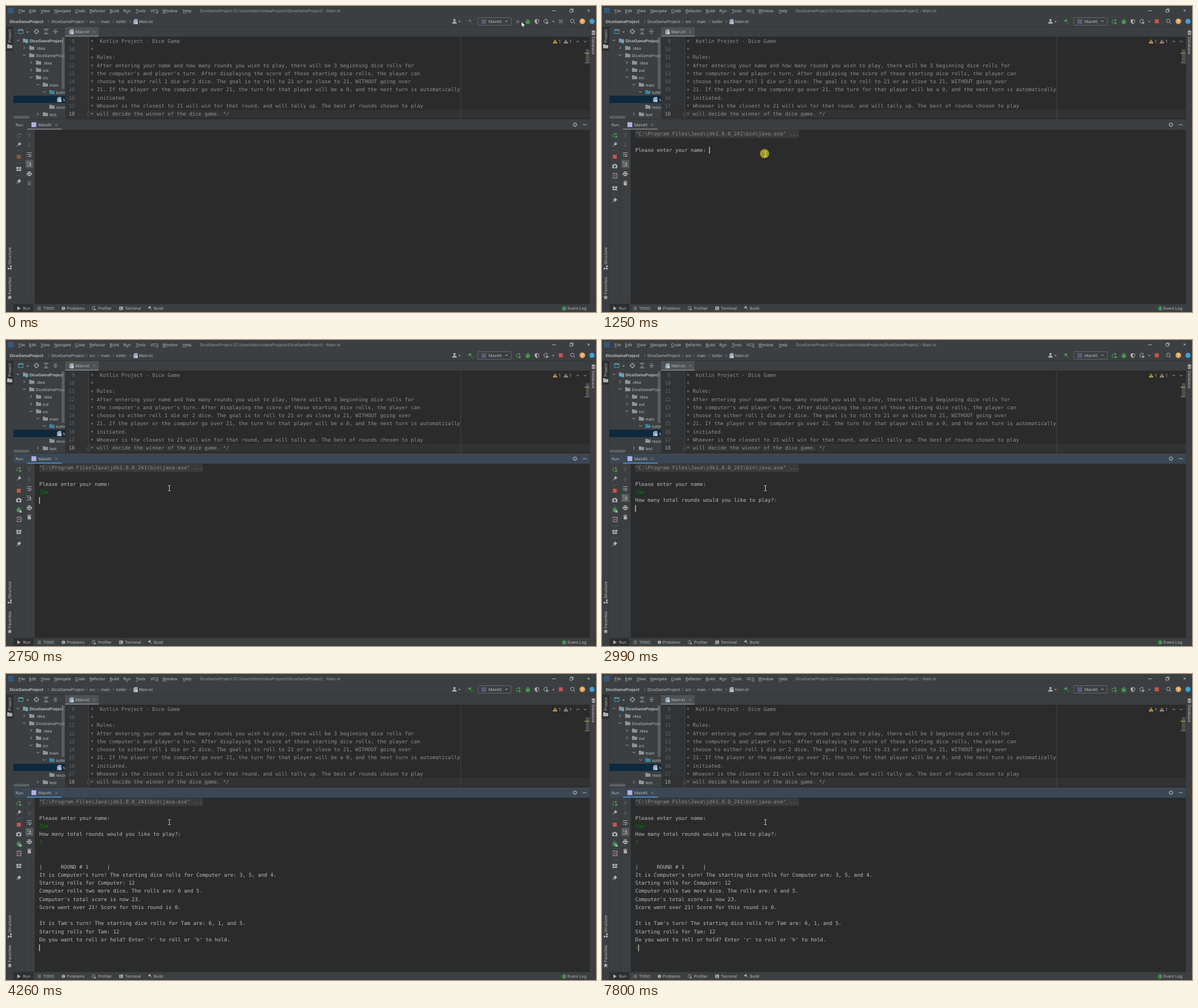
These frames come from a looping animation (1038x539 px, 8 s). An HTML page:

```html
<!DOCTYPE html>
<html lang="en">
<head>
<meta charset="utf-8">
<title>Dice game run</title>
<style>
  html, body { margin: 0; width: 100%; height: 100%; overflow: hidden; background: #3c3f41; }
  svg { display: block; width: 100%; height: 100%; }
  text { font: 7px Inter, sans-serif; fill: #bbb; white-space: pre; text-rendering: geometricPrecision; }
  .mono { font: 9px "DejaVu Sans Mono", monospace; }
  .bold { font-weight: 700; }
  .input { font-style: italic; fill: #007f00; }
  .u { text-decoration: underline; text-decoration-thickness: .5px; }
</style>
</head>
<body>
<svg id="stage" viewBox="0 0 1038 539" xmlns="http://www.w3.org/2000/svg"></svg>
<script>
const LOOP = 8000, COL = 5.42, ROW = 14.265;
const GREY = '#afb1b3', DIM = '#606365', GREEN = '#499c54', RED = '#c75450';

// Each icon is [stroked path, filled path], centred on 0,0.
const ICONS = {
  down: ['M-2.4 -1.2L0 1.2L2.4 -1.2', ''],
  up: ['M-2.4 1.2L0 -1.2L2.4 1.2', ''],
  right: ['M-1.2 -2.4L1.2 0L-1.2 2.4', ''],
  drop: ['', 'M-2 -1H2L0 1.3z'],
  close: ['M-2 -2L2 2M2 -2L-2 2', ''],
  folder: ['', 'M-4.5 -3.5H-1L0 -2.2H4.5V3.5H-4.5z'],
  doc: ['', 'M-1 -4.5H4V4.5H-3.5V-2z'],
  play: ['', 'M-3 -4L4 0L-3 4z'],
  reload: ['M2.6 -2.2A3.4 3.4 0 1 0 3.3 1', 'M4.3 -4.5V-.7H.5z'],
  rerun: ['M1.5 -2.6H-.6A3 3 0 0 0 -.8 3.4', 'M1 -4.8L4.4 -2.6L1 -.4zM.7 .8H4.2V4.3H.7z'],
  stop: ['', 'M-3.5 -3.5H3.5V3.5H-3.5z'],
  hammer: ['M-.5 -.8L3.7 3.6', 'M-4.4 -1.2L-1 -4.3L1.6 -3.6L.9 -2.5L1.6 -1L0 .7L-1.8 -.9L-3.2 .4z'],
  wrench: ['M-3.6 3.6L.8 -.8', 'M.2 1.2L-1 0L-.8 -2.6L1.5 -4.2L3 -3.9L1.4 -2.2L2.2 -1.4L4 -3L4.2 -1.2L2.6 1z'],
  bug: ['M-4 -2.2L-2 -1M4 -2.2L2 -1M-4.3 .6H4.3M-3.8 3.5L-2 2.3M3.8 3.5L2 2.3', 'M-2 -3A2 1.8 0 0 1 2 -3zM-2.7 -2H2.7V1.6A2.7 2.7 0 0 1 -2.7 1.6z'],
  shield: ['M0 -3.9L3.4 -2.8V0Q3 3 0 4Q-3 3 -3.4 0V-2.8z', 'M0 -4V4Q-3 3 -3.4 0V-2.8z'],
  clock: ['M2.8 -2.3A3.6 3.6 0 1 0 1 3.3M0 0L2.4 -1.8', 'M1 0L5 2.4L1 4.8z'],
  search: ['M1.8 1.8L4.2 4.2M2.4 -.7A3.1 3.1 0 1 1 -3.8 -.7A3.1 3.1 0 1 1 2.4 -.7', ''],
  person: ['', 'M-2 -2.3A2 2 0 0 1 2 -2.3Q2 0 0 0Q-2 0 -2 -2.3M-4 4Q-4 .6 0 .6Q4 .6 4 4z'],
  target: ['M3.5 0A3.5 3.5 0 1 1 -3.5 0A3.5 3.5 0 1 1 3.5 0M0 -4.7V-1.6M0 4.7V1.6M-4.7 0H-1.6M4.7 0H1.6', ''],
  expand: ['M-4 -4H4M-4 4H4M-2 -1L0 -2.7L2 -1M-2 1L0 2.7L2 1', ''],
  collapse: ['M-4 0H4M-2 -4L0 -2.2L2 -4M-2 4L0 2.2L2 4', ''],
  view: ['M-4 -3.5H4V3.5H-4z', 'M-4 -4H4V-1.7H-4z'],
  layout: ['', 'M-4.3 -3.5H-.5V0H-4.3zM.5 -3.5H4.3V0H.5zM-4.3 1H4.3V3.5H-4.3z'],
  pin: ['M-.8 .8L-4 4', 'M.5 -4.4L4.4 -.5L3.4 0L1.6 1.2L1.2 3.4L-3.4 -1.2L-1.2 -1.6L0 -3.4z'],
  camera: ['', 'M-4.5 -2.6H-2.2L-1.2 -4H1.2L2.2 -2.6H4.5V3.7H-4.5zM2 .5A2 2 0 1 0 -2 .5A2 2 0 1 0 2 .5z'],
  exit: ['M-3 -1.8V-4H4V4H-3V1.8', ''],
  enter: ['M-4.7 0H.5', 'M-.3 -2.4L2.4 0L-.3 2.4z'],
  arrowUp: ['M0 3.7V-3.3M-2.8 -.6L0 -3.4L2.8 -.6', ''],
  arrowDown: ['M0 -3.7V3.3M-2.8 .6L0 3.4L2.8 .6', ''],
  wrap: ['M-4.2 -3.2H4M-4.2 0H2.5A1.7 1.7 0 0 1 2.5 3.2H0M-4.2 3.2H-2.5', 'M1 1.2V5L-1.4 3.2z'],
  toEnd: ['M-4 3.6H4M-4 -3.5H-1.5M-4 -1H-1.5M1.5 -4V1', 'M-1 -.5H4L1.5 2.2z'],
  printer: ['', 'M-2.7 -4H2.7V-2.3H-2.7zM-4.4 -1.6H4.4V2.4H3V.6H-3V2.4H-4.4zM-2.3 1.4H2.3V4H-2.3z'],
  trash: ['', 'M-3.4 -3.5H-1.2V-4.2H1.2V-3.5H3.4V-2.5H-3.4zM-2.8 -1.8H2.8V4H-2.8z'],
  gear: ['M2.5 0A2.5 2.5 0 1 1 -2.5 0A2.5 2.5 0 1 1 2.5 0M0 -4.2V-2.6M0 4.2V2.6M-4.2 0H-2.6M4.2 0H2.6M-3 -3L-1.9 -1.9M3 3L1.9 1.9M-3 3L-1.9 1.9M3 -3L1.9 -1.9', ''],
  minus: ['M-3.5 0H3.5', ''],
  restore: ['M-3 -1.5H1.5V3H-3zM-1.5 -1.5V-3H3V1.5H1.5', ''],
  warn: ['', 'M0 -3.8L4.2 3.5H-4.2zM-.5 -1.4V1.2H.5V-1.4zM-.5 1.8V2.7H.5V1.8z'],
  list: ['M-1.6 -2.7H4M-1.6 0H4M-1.6 2.7H4M-4 -2.7H-2.8M-4 0H-2.8M-4 2.7H-2.8', ''],
  info: ['', 'M3.6 0A3.6 3.6 0 1 0 -3.6 0A3.6 3.6 0 1 0 3.6 0M-.5 -2.3V.6H.5V-2.3zM-.5 1.3V2.3H.5V1.3z'],
  shell: ['', 'M-4 -3.5H4V3.5H-4zM-2.8 -2L-1.2 -.3L-2.8 1.4L-2 2L.2 -.3L-2 -2.6zM.3 1.4V2.3H3V1.4z'],
  star: ['', 'M0 -4.2L1.2 -1.3L4.2 -1.2L1.9 .8L2.7 3.9L0 2.2L-2.7 3.9L-1.9 .8L-4.2 -1.2L-1.2 -1.3z'],
  blocks: ['', 'M-3.5 .5H-.5V3.5H-3.5zM.5 .5H3.5V3.5H.5zM.5 -3.5H3.5V-.5H.5z'],
  database: ['', 'M-3 -3Q0 -5 3 -3V-1.6Q0 -.3 -3 -1.6zM-3 -.8Q0 .5 3 -.8V.9Q0 2.1 -3 .9zM-3 1.7Q0 3 3 1.7V3.2Q0 5 -3 3.2z'],
};

const rect = (x, y, w, h, fill, extra = '') => `<rect x="${x}" y="${y}" width="${w}" height="${h}" fill="${fill}" ${extra}/>`;
const text = (x, y, s, extra = '') => `<text x="${x}" y="${y}" ${extra}>${s}</text>`;
const icon = (name, x, y, color = GREY) => {
  const [line, solid] = ICONS[name];
  return `<g transform="translate(${x} ${y})"><path d="${line}" fill="none" stroke="${color}"/><path d="${solid}" fill="${color}" fill-rule="evenodd"/></g>`;
};
const dot = (x, y, r, fill) => `<circle cx="${x}" cy="${y}" r="${r}" fill="${fill}"/>`;
const mark = (x, y, size, fill) => rect(x - size / 2, y - size / 2, size, size, fill);
const ktFile = (x, y) => icon('doc', x, y, '#9aa7b0') + mark(x + 2, y + 2, 4.5, '#b9c6d8');
const during = (from, to, body) => `<g data-from="${from}" data-to="${to}">${body}</g>`;
const swap = (time, before, after) => during(0, time, before) + during(time, LOOP, after);
const turned = (x, y, angle, s) => text(0, 0, s, `transform="translate(${x} ${y}) rotate(${angle})"`);

function titleAndToolbar() {
  const menu = [[22, '_File'], [40.5, '_Edit'], [61, '_View'], [85, '_Navigate'], [121.5, '_Code'], [147, '_Refactor'],
    [182.5, '_Build'], [206.5, 'R_un'], [228, '_Tools'], [254, 'VC_S'], [275, '_Window'], [311, '_Help']];
  const crumbs = [[80, 'DiceGameProject'], [147, 'src'], [167, 'main'], [194, 'kotlin'], [234, 'Main.kt']];
  return rect(3.5, 3, 10, 10, '#35567a')
    + menu.map(([x, s]) => text(x, 11.3, s.replace(/_(.)/, '<tspan class="u">$1</tspan>'))).join('')
    + text(341, 11.3, 'DiceGameProject [C:\\Users\\tdorn\\IdeaProjects\\DiceGameProject] - Main.kt', 'fill-opacity=".75"')
    + icon('minus', 964, 8.5) + icon('restore', 995, 8) + icon('close', 1025, 8)
    + text(6.5, 30.2, 'DiceGameProject', 'class="bold"')
    + crumbs.map(([x, s]) => text(x, 30.2, s)).join('')
    + [75, 142, 162, 189, 218.5].map(x => icon('right', x, 27.5, '#707375')).join('')
    + ktFile(227.5, 27.5)
    + icon('person', 789, 27) + icon('drop', 798, 27.5)
    + swap(510, icon('hammer', 817, 27.5, DIM), icon('hammer', 817, 27.5, GREEN))
    + rect(830, 20.5, 59, 13.5, 'none', 'stroke="#646868" rx="1.5"')
    + mark(840.5, 27.5, 8, '#5a5d78') + text(849, 30.2, 'MainKt') + icon('drop', 880.5, 27)
    + swap(510, icon('play', 901, 27.5, DIM) + icon('stop', 976, 27, DIM),
        icon('rerun', 901, 27.5, GREEN) + icon('stop', 976, 27, RED))
    + icon('bug', 918, 27.5, GREEN) + icon('shield', 934, 27.5) + icon('clock', 950, 27) + icon('drop', 963, 27.5)
    + icon('search', 997, 27) + dot(1014, 27, 5, '#e0a255')
    + `<g transform="translate(1014 27) scale(.75)">${icon('arrowUp', 0, 0, '#fff')}</g>`
    + dot(1031, 27, 4.5, '#3fa0d8')
    + rect(0, 36, 1038, 1, '#323232');
}

function projectTree() {
  const rows = [[21, 'DiceGameProject', 'down'], [32, '.idea', 'right'], [32, 'DiceGameProject', 'down'],
    [44, '.idea', 'right'], [44, 'out', 'right'], [44, 'src', 'down'], [56, 'main', 'down'],
    [67.5, 'kotlin', 'down'], [80, 'Main.kt'], [67.5, 'resources'], [56, 'test', 'right']];
  const tree = rows.map(([x, label, arrow], i) => {
    const y = 61 + i * 12.98;
    const color = label === 'kotlin' ? '#3e86a0' : '#8c969d';
    return (arrow ? icon(arrow, x, y - .5) : '')
      + (label === 'Main.kt' ? ktFile(x + 13.3, y) : icon('folder', x + 13.3, y - .3, color))
      + (i ? '' : rect(34.5, 61.5, 4, 4, '#40b6e0'))
      + text(x + 20.5, y + 2.7, label, i ? '' : 'class="bold"');
  }).join('');
  return icon('view', 26, 45, '#5a9bb8') + icon('drop', 38, 46) + icon('target', 53.5, 45)
    + icon('expand', 70.5, 45) + icon('collapse', 87, 45)
    + rect(13, 158, 91, 13, '#0d293e')
    + `<clipPath id="pane"><rect x="13" y="54" width="91" height="145"/></clipPath><g clip-path="url(#pane)">${tree}</g>`
    + rect(98, 55, 5, 91, '#707375', 'opacity=".6"') + rect(13, 193.5, 28, 5, '#5b5e60');
}

function editor() {
  const lines = ['  Kotlin Project - Dice Game', '', ' Rules:',
    ' After entering your name and how many rounds you wish to play, there will be 3 beginning dice rolls for',
    " the computer's and player's turn. After displaying the score of those starting dice rolls, the player can",
    ' choose to either roll 1 die or 2 dice. The goal is to roll to 21 or as close to 21, WITHOUT going over',
    ' 21. If the player or the computer go over 21, the turn for that player will be a 0, and the next turn is automatically',
    ' initiated.',
    ' Whoever is the closest to 21 will win for that round, and will tally up. The best of rounds chosen to play',
    ' will decide the winner of the dice game. */'];
  return rect(104, 37, 59, 17, '#4e5254') + rect(104, 52, 59, 2, '#747a80')
    + ktFile(115, 45.5) + text(122, 48.2, 'Main.kt') + icon('close', 155, 45.5, '#777a7c')
    + rect(104, 54, 923, 145, '#2b2b2b') + rect(104, 54, 41.5, 145, '#313335')
    + rect(104, 183, 923, 14.3, '#323232') + rect(145, 54, .7, 145, '#4b4d4e') + rect(799.6, 54, .8, 145, '#4d4d4d')
    + lines.map((s, i) => {
      const y = 64.8 + i * ROW;
      // The leading asterisk sits at mid height.
      return text(121, y, i + 9, `class="mono" text-anchor="end" style="fill:${i === 9 ? '#a4a3a3' : '#65686b'}"`)
        + text(148.8, y, `<tspan dy="1.3">*</tspan><tspan dy="-1.3">${s}</tspan>`, 'class="mono" style="fill:#909090"');
    }).join('')
    + '<path d="M143 193V189L145.5 187L148 189V193z" fill="#313335" stroke="#606366" stroke-width=".6"/>'
    + icon('warn', 966, 62.5, '#c9a24b') + text(972.5, 65.2, '1')
    + icon('warn', 985, 62.5, '#9c9482') + text(991.5, 65.2, '1')
    + icon('up', 1006, 62.5) + icon('down', 1019, 62.5)
    + rect(1020, 76, 6.5, 25, '#4d4f50') + rect(1017.5, 82.6, 9, 1.2, '#b5a13f') + rect(1017.5, 99.6, 9, 1, '#7d7960');
}

function stripes() {
  return rect(0, 37, 13, 42, '#2d2f30') + turned(9, 64.5, -90, 'Project') + icon('folder', 6.5, 71)
    + turned(9, 455.5, -90, 'Structure') + icon('blocks', 6.5, 460.5)
    + turned(9, 507.5, -90, 'Favorites') + icon('star', 6.5, 513)
    + icon('database', 1033.5, 47) + turned(1030.6, 54, 90, 'Database')
    + rect(12.5, 37, .6, 488, '#323232') + rect(1027, 37, .6, 488, '#323232');
}

function runWindow() {
  const left = (y, name, color) => icon(name, 22.5, y, color);
  const rule = y => rect(17, y, 11, .7, '#55585a');
  const exit = y => left(y, 'exit') + left(y, 'enter', RED);
  return rect(13, 199, 1014, 1, '#323232')
    + during(1390, LOOP, rect(13, 200, 1014, 17.5, '#3b4754'))
    + text(17, 212, 'Run:') + mark(49, 209, 8.5, '#b5aee6') + text(57, 212, 'MainKt') + icon('close', 88.5, 209.5, '#85888a')
    + swap(1390, rect(37, 215.8, 61, 2, '#747a80'), rect(37, 215.8, 61, 2, '#4a88c7'))
    + icon('gear', 1001, 209) + icon('minus', 1018, 209)
    + rect(50.5, 218, 976.5, 307, '#2b2b2b') + rect(32, 218, .6, 307, '#343638')
    + swap(510, left(228, 'reload', DIM) + left(265.5, 'stop', '#8a5638'), left(228, 'rerun', GREEN) + left(265.5, 'stop', RED))
    + left(244, 'wrench') + rule(254.5)
    + during(0, 510, rule(276) + left(287, 'layout') + rule(298) + left(309, 'pin'))
    + during(510, LOOP, left(282, 'camera'))
    + during(510, 1750, exit(299) + rule(310) + left(321, 'layout') + rule(331.5) + left(342, 'pin'))
    + during(1750, LOOP, left(299, 'bug', GREEN) + rect(23.5, 300.5, 4, 3.5, GREY) + exit(316) + rule(327)
        + left(338, 'layout') + rule(348) + left(359, 'pin'))
    + icon('arrowUp', 41, 228, DIM) + icon('arrowDown', 41, 244.5, DIM) + icon('wrap', 41, 261.5)
    + swap(2750, rect(34, 271, 14, 14.5, '#55595c', 'rx="1.5"'), '')
    + during(2990, LOOP, rect(34, 271, 14, 14.5, '#55595c', 'rx="1.5"'))
    + icon('toEnd', 41, 278) + icon('printer', 41, 295.5)
    + swap(510, icon('trash', 41, 312, DIM), icon('trash', 41, 312));
}

function consoleText() {
  const line = (row, s, cls = '') => text(58.5, 228.4 + row * ROW, s, `class="mono ${cls}"`);
  const typed = [[2000, 2130, 3, 'T'], [2130, 2250, 3, 'Ta'], [2250, LOOP, 3, 'Tam'], [3750, LOOP, 5, '3'], [7800, LOOP, 18, 'r']];
  const round = ['|      ROUND # 1      |',
    "It is Computer's turn! The starting dice rolls for Computer are: 3, 5, and 4.",
    'Starting rolls for Computer: 12',
    'Computer rolls two more dice. The rolls are: 6 and 5.',
    "Computer's total score is now 23.",
    'Score went over 21! Score for this round is 0.',
    '',
    "It is Tam's turn! The starting dice rolls for Tam are: 6, 1, and 5.",
    'Starting rolls for Tam: 12',
    "Do you want to roll or hold? Enter 'r' to roll or 'h' to hold."];
  return during(130, LOOP, rect(58.5, 218.5, 288, 14, '#3a3a3a')
      + text(58.5, 228.4, '"C:\\Program Files\\Java\\jdk1.8.0_241\\bin\\java.exe" ...', 'class="mono" style="fill:#8c8c8c"'))
    + during(640, LOOP, line(2, 'Please enter your name: '))
    + during(2870, LOOP, line(4, 'How many total rounds would you like to play?:'))
    + during(4260, LOOP, round.map((s, i) => line(8 + i, s)).join(''))
    + typed.map(([from, to, row, s]) => during(from, to, line(row, s, 'input'))).join('');
}

function statusBar() {
  const tabs = [[22.5, 30, 'play', 'Run'], [58, 65, 'list', 'TODO'], [101, 107, 'info', 'Problems'],
    [154.5, 162, 'clock', 'Profiler'], [202.5, 209, 'shell', 'Terminal'], [253.5, 260, 'hammer', 'Build']];
  return rect(0, 524.5, 1038, .8, '#323232') + rect(13, 525, 35, 14, '#2d2f30')
    + tabs.map(([ix, tx, name, s]) =>
      `<g transform="translate(${ix} 532.5) scale(.85)">${icon(name, 0, 0)}</g>` + text(tx, 535.3, s)).join('')
    + dot(982, 532.7, 4.3, '#3d7a48') + text(982, 534.8, '2', 'text-anchor="middle" style="font-size:6px"')
    + text(988, 535.3, 'Event Log');
}

const stage = document.getElementById('stage');
stage.innerHTML = rect(0, 0, 1038, 539, '#3c3f41') + titleAndToolbar() + projectTree() + editor() + runWindow()
  + consoleText() + stripes() + statusBar()
  + `<rect id="caret" width="1.3" height="12" fill="#d0d0d0"/>`
  + during(1250, 1390, dot(286, 260, 8, '#a39a1c'))
  + `<g id="mouse"><path d="M0 0V8.5L2 6.8L3.4 9.6L4.8 9L3.5 6.3H6.2z" fill="#fff" stroke="#222" stroke-width=".4"/>
     <path d="M-2.3 -4.5H-.5L0 -4L.5 -4.5H2.3M0 -4V4M-2.3 4.5H-.5L0 4L.5 4.5H2.3" fill="none" stroke="#ddd" stroke-width=".9"/></g>`;

// [time, column, row]; no column means hidden.
const caretSteps = [[0], [1250, 24, 2], [1750], [2000, 1, 3], [2130, 2, 3], [2250, 3, 3], [2750, 0, 4], [2870, 0, 5],
  [3510], [3750, 1, 5], [4010, 0, 6], [4260, 0, 18], [5010], [5510, 0, 18], [6030], [6530, 0, 18], [7030],
  [7550, 0, 18], [7800, 1, 18]];
// [time, x, y]
const mouseSteps = [[0, 907, 28], [510, 842, 62], [640, 664, 150], [760, 466.5, 240], [1010, 352, 254], [1130, 287.5, 261]];

const timed = [...stage.querySelectorAll('[data-from]')];
const caret = document.getElementById('caret');
const mouse = document.getElementById('mouse');
const [arrow, beam] = mouse.children;
const stepAt = (steps, t) => steps.findLast(step => step[0] <= t);
const show = (el, on) => { el.style.display = on ? '' : 'none'; };

function draw(t) {
  for (const el of timed) show(el, t >= +el.dataset.from && t < +el.dataset.to);
  const [, col, row] = stepAt(caretSteps, t);
  show(caret, col !== undefined);
  if (col !== undefined) {
    caret.setAttribute('x', 58.3 + col * COL);
    caret.setAttribute('y', 219.5 + row * ROW);
  }
  const [, x, y] = stepAt(mouseSteps, t);
  mouse.setAttribute('transform', `translate(${x} ${y})`);
  show(arrow, y < 54);
  show(beam, y >= 54);
}

const start = performance.now();
function tick() {
  draw((performance.now() - start) % LOOP);
  requestAnimationFrame(tick);
}
tick();
</script>
</body>
</html>
```
